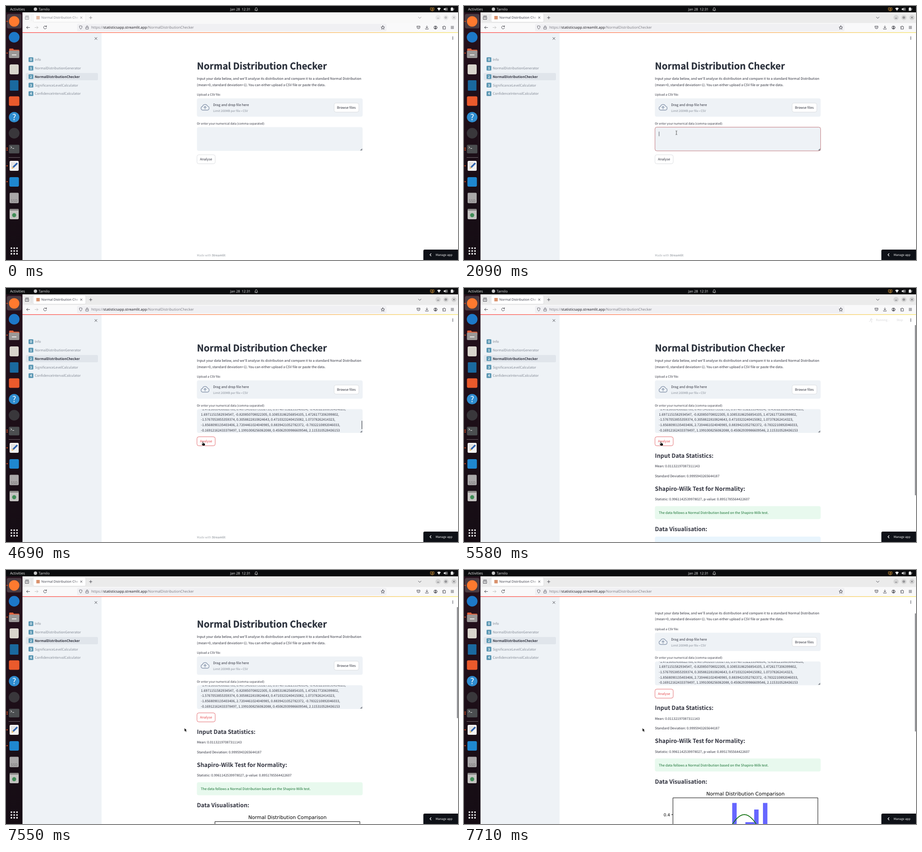
An HTML page for the animation above (8 s loop, 998 by 561 pixels).

```html
<!DOCTYPE html>
<html lang="en">
<head>
<meta charset="utf-8">
<title>Normal Distribution Checker</title>
<style>
html, body { margin: 0; width: 100%; height: 100%; overflow: hidden; background: #fff; }
svg { display: block; width: 998px; height: 561px; text-rendering: geometricPrecision; }
text { font: 7.45px "Noto Sans CJK JP", "Noto Sans CJK SC", sans-serif; fill: #31333f; }
.h1 { font-size: 20.42px; font-weight: 700; fill: #2b313c; stroke: #2b313c; stroke-width: .3; }
.h3 { font-size: 12.65px; font-weight: 700; }
.small { font-size: 6.52px; }
.bold { font-weight: 700; }
.chosen { font-size: 7.32px; font-weight: 700; }
.muted { fill: #858c97; }
.mid { text-anchor: middle; }
.ui { font: 7.7px "Open Sans", "Noto Sans", sans-serif; }
.plot { font: 8.96px "DejaVu Sans", sans-serif; fill: #000; }
.box { fill: #eef2f6; }
.btn { fill: #fff; stroke: #d3d6da; stroke-width: .8; }
.line { fill: none; stroke: #3c3c43; stroke-width: .9; stroke-linecap: round; stroke-linejoin: round; }
.bar text { fill: #eee; }
</style>
</head>
<body>
<svg viewBox="0 0 998 561">
  <defs>
    <linearGradient id="strip"><stop stop-color="#ff4b4b"/><stop offset="1" stop-color="#f5e468"/></linearGradient>
    <linearGradient id="dockFill" x2="0" y2="1"><stop stop-color="#25101c"/><stop offset="1" stop-color="#150d14"/></linearGradient>
    <linearGradient id="tabFade"><stop offset=".85" stop-color="#fff" stop-opacity="0"/><stop offset="1" stop-color="#fff"/></linearGradient>
    <clipPath id="areaClip"><path d="M422 268h365v51.5h-365z"/></clipPath>
  </defs>
  <rect width="998" height="561" fill="#fff"/>

  <g id="page">
    <text class="h1" x="421.5" y="140.2">Normal Distribution Checker</text>
    <text x="421.5" y="163.3">Input your data below, and we'll analyse its distribution and compare it to a standard Normal Distribution</text>
    <text x="421.5" y="176.9">(mean=0, standard deviation=1). You can either upload a CSV file or paste the data.</text>
    <text class="small" x="421.5" y="198">Upload a CSV file:</text>
    <rect class="box" x="421.5" y="204" width="366" height="40.5" rx="4"/>
    <path class="line" style="stroke:#8d9bb0;stroke-width:1.4" d="M434.5 230a4.2 4.2 0 0 1-.5-8.3a5.7 5.7 0 0 1 10.8-.6a4.5 4.5 0 0 1-.3 8.9zM439.5 227.5v-5.5m-2.5 2.3l2.5-2.5l2.5 2.5"/>
    <text x="457.3" y="221.3">Drag and drop file here</text>
    <text class="small muted" x="457.3" y="234.4">Limit 200MB per file • CSV</text>
    <rect class="btn" x="724.5" y="214.3" width="54.5" height="20" rx="4"/>
    <text class="mid" x="751.5" y="227.2">Browse files</text>
    <text class="small" x="421.5" y="261.8">Or enter your numerical data (comma-separated):</text>
    <rect class="box" id="area" x="421.7" y="267.6" width="365.7" height="52.4" rx="4" stroke="#b5585f" stroke-width=".8"/>
    <path d="M786.5 314.5v4.5h-5z" fill="#84888f"/>
    <g id="data" clip-path="url(#areaClip)">
      <text x="430.3" y="270.3">-1.4725061438822768, 0.40754510575552755, 0.07407152255548654, -0.45812106098454026,</text>
      <text x="430.3" y="281.7">1.6971151582934547, -0.820850708022305, 0.10853186256854105, 1.4726177206399802,</text>
      <text x="430.3" y="293.3">-1.5767053855359374, 0.3058822810824643, 0.4710323240415082, 1.07378262414323,</text>
      <text x="430.3" y="305">-1.8568090135403406, 2.7204461024040985, 0.8839421052782372, -0.7832210892046033,</text>
      <text x="430.3" y="316.6">-0.16912162433378497, 1.1991008256062088, 0.45062939986609546, 2.115310528436153</text>
    </g>
    <text id="hint" class="muted" style="font-size:5.6px" text-anchor="end" x="785" y="317.3">Press Ctrl+Enter to apply</text>
    <rect id="areaThumb" x="785" y="293" width="1.6" height="19" rx=".8" fill="#6b6c72"/>
    <rect id="caret" width=".8" height="10" fill="#31333f"/>
    <rect class="btn" id="button" x="421.7" y="328.6" width="40.2" height="19.9" rx="4"/>
    <text class="mid" id="buttonText" x="441.6" y="341.4">Analyse</text>
    <text class="small" id="footer" x="421.5" y="552.7" style="fill:#a3a8ae">Made with <tspan class="bold">Streamlit</tspan></text>

    <g id="results">
      <text class="h3" x="421.5" y="374.9">Input Data Statistics:</text>
      <text x="421.5" y="396.4">Mean: 0.01132197087311143</text>
      <text x="421.5" y="417.8">Standard Deviation: 0.9995943265644187</text>
      <text class="h3" x="421.5" y="447.8">Shapiro-Wilk Test for Normality:</text>
      <text x="421.5" y="469.2">Statistic: 0.9961142539978027, p-value: 0.8951785564422607</text>
      <rect x="421.5" y="481.7" width="366" height="28.8" rx="4" fill="#e8f9ee"/>
      <text x="430" y="499" style="fill:#177233">The data follows a Normal Distribution based on the Shapiro-Wilk test.</text>
      <text class="h3" x="421.5" y="537.2">Data Visualisation:</text>
    </g>
    <g id="loading">
      <rect x="421.5" y="549" width="366" height="28.8" rx="4" fill="#e9f5fd"/>
      <text x="430" y="566.5" style="fill:#0a5c93">Running...</text>
    </g>
    <g id="chart">
      <text class="plot mid" style="font-size:10.75px" x="621.3" y="563.3">Normal Distribution Comparison</text>
      <text class="plot" text-anchor="end" x="455" y="609">0.4</text>
      <g id="bars" fill="#6666ff"></g>
      <path id="curve" fill="none" stroke="#10700f" stroke-width="1.7"/>
      <path d="M461.3 568.7h320v238h-320zM458 605.7h3.3" fill="none" stroke="#000"/>
    </g>
  </g>

  <rect id="pageThumb" x="995.7" y="59" width="2" rx=".9" fill="#77787d"/>
  <rect x="211" y="59" width="784" height="23" fill="#fff"/>
  <rect x="995" y="59" width="3" height="23" fill="#fff"/>
  <g id="running" opacity=".2">
    <path class="line" d="M900 67v.2m-3 2l3-1l2 2.5m-3-2l-1 3l2.5 1.5l-.5 3m-2-4.5l-3 2.5"/>
    <text class="small" x="909.5" y="73.2">Running...</text><text class="small" x="955" y="73.2">Stop</text>
  </g>
  <path d="M986.5 68.3v0m0 2.5v0m0 2.5v0" stroke="#31333f" stroke-width="1.8" stroke-linecap="round"/>

  <rect class="box" x="36" y="59" width="175" height="502"/>
  <path class="line" d="M196 69.3l5 5m0-5l-5 5"/>
  <rect x="43.5" y="148" width="159.5" height="16" rx="2.5" fill="#e0e5eb"/>
  <g id="menu"></g>
  <path d="M921.5 561v-20q0-3 3-3h73.5v23z" fill="#0e1117"/>
  <path class="line" style="stroke:#fff;stroke-width:1.2" d="M938.5 547l-2.5 2.5l2.5 2.5"/>
  <text class="small" x="948.7" y="551.7" style="fill:#fff">Manage app</text>

  <rect id="tabBar" x="36" y="14" width="962" height="24"/>
  <rect x="36" y="37.5" width="962" height="20.5" fill="#f9f9fa"/>
  <rect x="36" y="58" width="962" height="1.3" fill="url(#strip)"/>
  <g id="tabs">
    <rect x="60" y="16" width="116" height="19.5" rx="2.5" fill="#fff" stroke="#d0d0d4" stroke-width=".6"/>
    <rect x="67" y="22" width="7.5" height="7.5" fill="#d9916c"/>
    <text class="ui" style="font-size:7.2px" x="78" y="28.4">Normal Distribution Che</text>
    <rect x="78" y="18" width="84" height="15" fill="url(#tabFade)"/>
    <path class="line" d="M164.3 23.7l3.8 3.8m0-3.8l-3.8 3.8M184 25.8h6m-3-3v6M43 24h7v5.5h-7zm0-2h7m-4.5 4.5h2M910.5 24.5l3 2.8l3-2.8"/>
    <path d="M56 19v14" stroke="#d0d0d4" stroke-width=".6"/>
    <g fill="#000" fill-opacity=".09"><circle cx="954" cy="25.5" r="5.7"/><circle cx="971.3" cy="25.5" r="5.7"/><circle cx="989" cy="25.5" r="5.7"/></g>
    <path class="line" style="stroke-width:.8" d="M952.3 27h3.5M969.8 24h3v3h-3zM987.3 23.8l3.4 3.4m0-3.4l-3.4 3.4"/>
  </g>
  <rect x="157" y="39.5" width="683" height="16.3" rx="2.5" fill="#f0f0f3"/>
  <path class="line" d="M52.3 47.5h-7m2.8-2.8l-2.8 2.8l2.8 2.8M89 45.3a3.3 3.3 0 1 0 .5 3m0-4.8v2.2h-2.3"/>
  <path class="line" style="stroke:#bbb" d="M63.8 47.5h7m-2.8-2.8l2.8 2.8l-2.8 2.8"/>
  <path class="line" style="stroke:#5c5c66" d="M165 43.7l3 1q0 4.5-3 6.5q-3-2-3-6.5zM176.5 47h5.4v4h-5.4zm1-.2v-1.3a1.7 1.7 0 0 1 3.4 0v1.3"/>
  <path class="line" d="M832 43.6l1.2 2.6l2.8.3l-2.1 1.9l.6 2.8l-2.5-1.4l-2.5 1.4l.6-2.8l-2.1-1.9l2.8-.3zM907.5 44.5h6.5v2.5a3.2 3.2 0 0 1-6.5 0zm1.7 2l1.6 1.5l1.6-1.5M929.3 43.8v4.7m-2.2-2l2.2 2.2l2.2-2.2M926 50v1h6.6v-1M964.5 45.5h2q0-2 1.3-1.5q.9.5.5 1.5h2v5.5h-5.8v-2q1.7 0 1.5-1q0-1-1.5-.7zM982.5 45h6m-6 2.4h6m-6 2.4h6"/>
  <circle class="line" cx="948.3" cy="47.5" r="3.6"/><circle cx="948.3" cy="46.4" r="1.4" fill="#3c3c43"/><path d="M945.9 49.8q2.4-2.8 4.8 0l-2.4 1.2z" fill="#3c3c43"/>
  <text class="ui" style="font-size:7.87px;fill:#7a7a82" x="188.3" y="50.4">https://<tspan fill="#15141a">statisticsapp.streamlit.app</tspan>/NormalDistributionChecker</text>

  <g class="bar">
    <rect width="998" height="14" fill="#0b0c0e"/>
    <text class="ui" style="font-size:8px" x="9" y="9.8">Activities</text>
    <circle cx="65" cy="7" r="3.7" fill="#c9c9c9"/>
    <text class="ui" x="72" y="9.8">Tarnilo</text>
    <text class="ui" style="font-size:7.6px" x="495" y="9.7">Jan 28&#160; 12:31</text>
    <path class="line" style="stroke:#ddd" d="M549.5 9q1-1 1-3.5q0-1.8 2-1.8t2 1.8q0 2.5 1 3.5zm2.3 1.8h1.5"/>
    <path class="line" style="stroke:#e8a13a" d="M937.5 4h7.5v5h-7.5zm2 6.8h3.5"/><circle cx="941.3" cy="6.5" r="1.2" fill="#e8a13a"/>
    <path d="M952 5q4-3.2 8 0l-4 5.5zM966.5 5.5h2l2.2-2v7l-2.2-2h-2zM982 4h5.5v6.5h-5.5zm1.5-1.2h2.5v1h-2.5z" fill="#eee"/>
    <path class="line" style="stroke:#eee" d="M972 5.2q1.2 1.8 0 3.6m1.5-5q2 3.2 0 6.4M988.5 8l1-2"/>
  </g>

  <rect y="14" width="36.4" height="547" fill="url(#dockFill)"/>
  <g id="dock">
    <rect x="2" y="17.5" width="32" height="32" rx="4" fill="#4a3c43"/>
    <circle cx="18" cy="34" r="11.5" fill="#ff7a2f"/>
    <circle cx="18" cy="69" r="11.8" fill="#1d78c8"/>
    <path d="M7 95.5q0-1.5 1.5-1.5h7l2 2.5h10.5q1.5 0 1.5 1.5v5h-22.5z" fill="#e2603a"/>
    <rect x="6.5" y="98.5" width="23" height="16.5" rx="2" fill="#9b9897"/><path d="M13 108h10" stroke="#e8e6e5" stroke-width="2"/>
    <rect x="8" y="129" width="20" height="22" rx="3" fill="#d8d4cc"/>
    <rect x="8.5" y="164" width="19" height="23" rx="1.5" fill="#1a699f"/>
    <rect x="6.5" y="199.5" width="23" height="21" rx="3" fill="#ea5a2c"/>
    <circle cx="18" cy="245.5" r="11.6" fill="#2f8ccf"/><text class="mid" x="18" y="252" style="font-size:18px;fill:#fff">?</text>
    <circle cx="18" cy="281" r="11.8" fill="#39373b"/>
    <rect x="6.5" y="306.5" width="23" height="19" rx="2" fill="#4b4e50"/><path class="line" style="stroke:#fff" d="M10.5 310.5l2.5 1.8l-2.5 1.8m4 .5h3"/>
    <path d="M6 334.5h25" stroke="#8a8186" stroke-width=".8"/>
    <rect x="8" y="342" width="20" height="22" rx="2.5" fill="#f3f2f1"/><path d="M11 347h10m-10 4h7m-7 4h5" stroke="#b9b7b6"/><path d="M15 357l10-10" stroke="#2c60ad" stroke-width="3.5"/><path d="M13 359l3-3" stroke="#edbd67" stroke-width="2.5"/>
    <rect x="7.5" y="378" width="21" height="21" rx="3" fill="#1f87cf"/>
    <rect x="8" y="412.5" width="20" height="23" rx="2" fill="#a9a7a8"/><text class="mid" x="18" y="433" style="font-size:8px;fill:#747273">SSD</text>
    <rect x="8" y="448" width="20" height="23" rx="2.5" fill="#c3c2c0"/><rect x="8" y="448" width="20" height="4" rx="2" fill="#8b8988"/><circle cx="18" cy="462" r="4.5" fill="#3f8c56"/>
  </g>

  <g id="cursor">
    <path id="arrow" d="M0 0v7.8l1.8-1.6l1.3 2.8l1.5-.7l-1.3-2.7h2.4z" fill="#000" stroke="#fff" stroke-width=".6"/>
    <path id="beam" d="M-1.8-4.2q1.8 0 1.8.8v6.8q0 .8-1.8.8m3.6-8.4q-1.8 0-1.8.8m0 6.8q0 .8 1.8.8" fill="none" stroke="#444" stroke-width=".9"/>
    <path id="hand" d="M-.8 0q.8-1 1.5 0v3.300l3.400.8q1 .5.7 1.700l-.7 3.200h-4.600l-2.500-3.600q-.2-1 .8-.9l1.400 1z" fill="#000" stroke="#fff" stroke-width=".5"/>
  </g>
</svg>
<script>
const $ = id => document.getElementById(id);
const LOOP = 8000, FOCUS = 1790, PASTE = 2830, CLICK = 4530, RESULT = 5580, CHART = 6320;
const shape = (tag, attrs) => `<${tag} ${Object.entries(attrs).map(([k, v]) => `${k}="${v}"`).join(' ')}/>`;

// Sidebar entries with keycap digits
['Info', 'NormalDistributionGenerator', 'NormalDistributionChecker', 'SignificanceLevelCalculator', 'ConfidenceIntervalCalculator']
  .forEach((name, i) => {
    const y = 118.5 + 18.75 * i;
    $('menu').innerHTML += shape('rect', { x: 49.8, y: y - 5.3, width: 10.6, height: 10.6, rx: 1.5, fill: '#5a97b3' }) +
      `<text class="bold mid" x="55.1" y="${y + 2.8}" style="fill:#fff">${i}</text>
       <text class="${i == 2 ? 'chosen' : 'muted'}" x="63.4" y="${y + 2.8}">${name}</text>`;
  });

// Histogram and bell curve
[[0, 580], [3, 622.5], [4, 622.5], [5, 594.5], [7, 580]].forEach(([bin, y]) =>
  $('bars').innerHTML += shape('rect', { x: 592.2 + 9.7 * bin, y, width: 9.8, height: 806.7 - y }));
$('curve').setAttribute('d', 'M' + Array.from({ length: 61 }, (_, i) => {
  const z = (i - 30) / 12;
  return `${619 + 56 * z} ${806.7 - 201 * Math.exp(-z * z / 2)}`;
}).join('L'));

// Dock: running marks and the app grid
[34, 104, 314, 318, 353, 388].forEach(cy => $('dock').innerHTML += shape('circle', { cx: 2.5, cy, r: 1.3, fill: '#e95420' }));
for (let i = 0; i < 9; i++)
  $('dock').innerHTML += shape('rect', { x: 10.2 + i % 3 * 6.2, y: 533.2 + Math.floor(i / 3) * 6.2, width: 3.4, height: 3.4, rx: 1, fill: '#f2f2f2' });

// Pointer moves: start, end, positions shown, from, to
const moves = [
  [700, 1470, 11, [911, 364], [484, 300]],
  [1550, 2090, 8, [482, 298], [469, 280]],
  [3640, 3960, 5, [454, 302], [434.8, 339.3]],
  [6570, 6890, 5, [432, 342], [394, 349]]
];
const clamp = v => Math.min(1, Math.max(0, v));
const progress = (t, start, end, count) => Math.floor(clamp((t - start) / (end - start)) * (count - 1) + 1e-6) / (count - 1);
const show = (id, on) => $(id).style.display = on ? '' : 'none';
const fade = (id, v) => $(id).style.opacity = v;

function pointer(t) {
  const move = moves.findLast(m => t >= m[0]);
  if (!move) return null;
  const [start, end, count, from, to] = move;
  const p = progress(t, start, end, count), e = 1 - (1 - p) ** 2;
  return from.map((v, i) => v + (to[i] - v) * e);
}

function draw(t) {
  const pos = pointer(t);
  show('cursor', pos);
  let overButton = false;
  if (pos) {
    const [x, y] = pos;
    const overArea = x > 421 && x < 788 && y > 267 && y < 320;
    overButton = x > 421 && x < 462 && y > 328 && y < 349;
    $('cursor').setAttribute('transform', `translate(${x} ${y})`);
    show('beam', overArea);
    show('hand', overButton);
    show('arrow', !overArea && !overButton);
  }

  const active = t >= FOCUS, pasted = t >= PASTE, clicked = t >= CLICK;
  $('tabBar').style.fill = active ? '#ebebeb' : '#f8f8f8';
  fade('tabs', active ? 1 : .6);
  $('area').style.strokeOpacity = progress(t, FOCUS, 2030, 4) * (1 - progress(t, CLICK - 80, 4690, 4));
  show('data', pasted);
  fade('hint', clicked ? 0 : progress(t, PASTE - 80, 3150, 6));
  fade('areaThumb', pasted ? 1 - progress(t, 4930, 5090, 3) : 0);
  show('caret', active && t < 4290);
  $('caret').setAttribute('x', pasted ? 737.6 : 430.4);
  $('caret').setAttribute('y', pasted ? 308.5 : 277.5);

  const pressed = clicked && t < CLICK + 80, red = overButton || clicked;
  $('button').style.fill = pressed ? '#ff4b4b' : '#fff';
  $('button').style.stroke = red ? '#dc4a4e' : '#d3d6da';
  $('buttonText').style.fill = pressed ? '#fff' : red ? '#e5484c' : '#31333f';

  const done = t >= RESULT;
  show('footer', !done);
  show('results', done);
  show('running', done && t < 5660);
  show('loading', done && t < 6160);
  show('chart', t >= CHART);

  const scroll = t < 7550 ? 0 : 13 + 52.5 * progress(t, 7550, 7710, 3);
  $('page').setAttribute('transform', `translate(0 ${-scroll})`);
  show('pageThumb', done);
  $('pageThumb').setAttribute('height', t < 6160 ? 399 : t < CHART ? 420 : 261);
  $('pageThumb').setAttribute('y', 59 + scroll * .56);
}

function frame() {
  draw(performance.now() % LOOP);
  requestAnimationFrame(frame);
}
frame();
</script>
</body>
</html>
```
